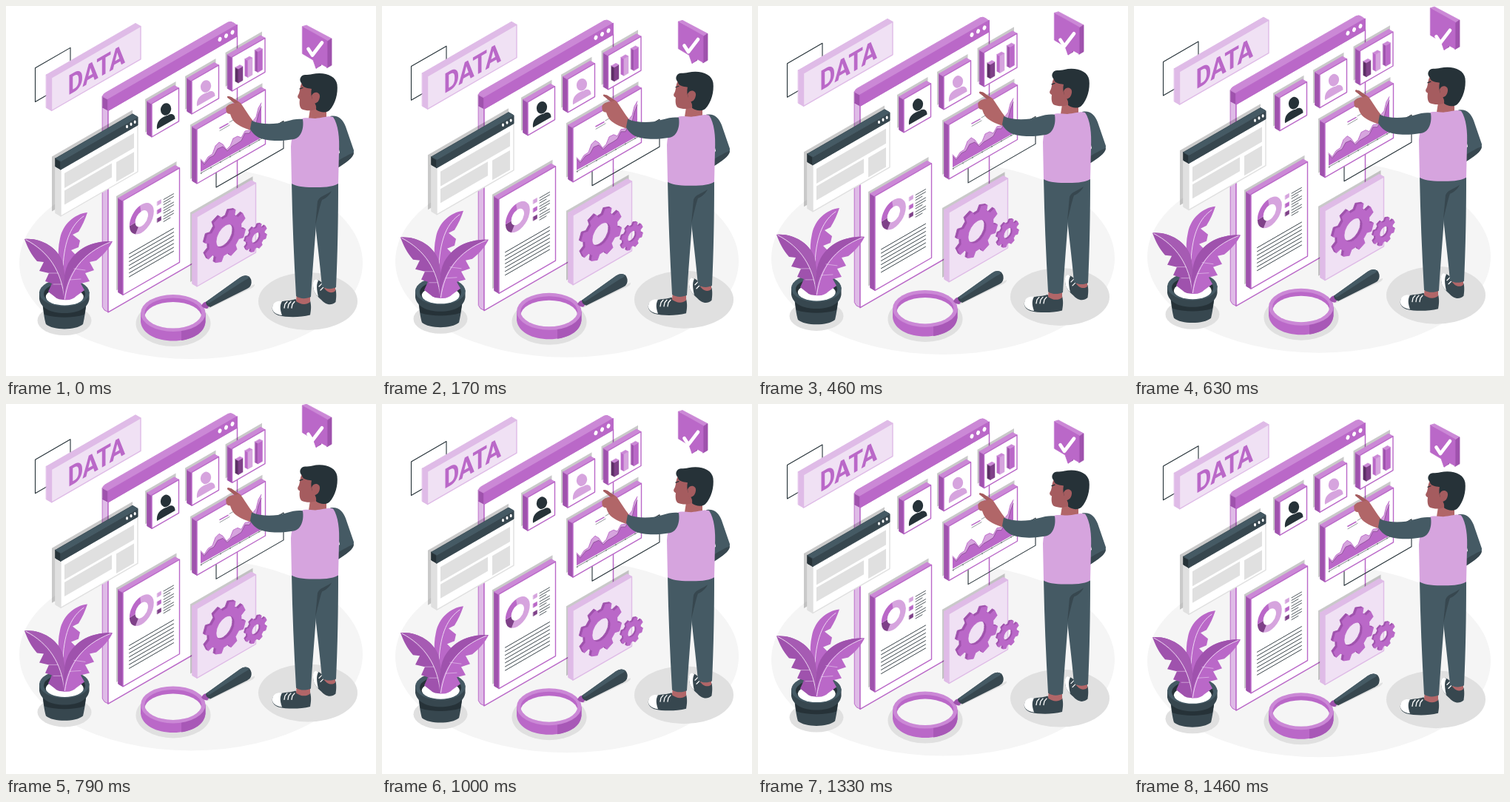
These frames come from a looping animation (500x500 px, 1500 ms). An HTML page:

```html
<!DOCTYPE html>
<html lang="en">
<head>
<meta charset="utf-8">
<title>Data dashboard</title>
<style>
html, body { margin: 0; width: 100%; height: 100%; overflow: hidden; background: #fff; }
svg { display: block; width: 100vw; height: 100vh; }
</style>
</head>
<body>
<svg id="stage" viewBox="0 0 500 500" xmlns="http://www.w3.org/2000/svg"></svg>
<script>
const C = {
  main: '#ba68c8', dark: '#9f52ad', deep: '#7f4189', top: '#cb88d6', soft: '#d6a4de',
  pale: '#f0e1f4', edge: '#dfbbe7', slate: '#455a64', navy: '#37474f', ink: '#263238',
  grey: '#e0e0e0', skin: '#b16668', face: '#a55c5f'
};
const K = 0.577; // isometric slope

const path = (d, fill = 'none', stroke = 'none', w = 1, extra = '') =>
  `<path d="${d}" fill="${fill}" stroke="${stroke}" stroke-width="${w}" stroke-linejoin="round" stroke-linecap="round" ${extra}/>`;
const poly = (pts, fill, stroke, w, extra) => path('M' + pts.join('L') + 'Z', fill, stroke, w, extra);
const line = (pts, stroke, w = 1) => path('M' + pts.join('L'), 'none', stroke, w);
const oval = (x, y, rx, ry, fill, extra = '') =>
  `<ellipse cx="${x}" cy="${y}" rx="${rx}" ry="${ry}" fill="${fill}" ${extra}/>`;
const iso = (x, y, body) => `<g transform="matrix(.866 -.5 0 1 ${x} ${y})">${body}</g>`;

// Parallelogram lying in the wall plane
const slab = (x, y, w, h) => [[x, y], [x + w, y - K * w], [x + w, y - K * w + h], [x, y + h]];

function panel(x, y, w, h, o = {}) {
  const { side = C.dark, top = C.top, face = '#fff', stroke = C.main, d = 6, shade = 3 } = o;
  const e = d * K, r = x + w, yr = y - K * w;
  return (shade ? poly(slab(x - d - shade, y - e - 2.5, w + 5, h), '#000', 'none', 1, 'fill-opacity=".21"') : '') +
    poly([[x - d, y - e], [x, y], [x, y + h], [x - d, y + h - e]], side, side, 1) +
    poly([[x - d, y - e], [r - d, yr - e], [r, yr], [x, y]], top, top, 1) +
    poly(slab(x, y, w, h), face, stroke, 1.4);
}

function gear(x, y, r, hole, depth) {
  const n = 8, pts = [];
  for (let i = 0; i < n; i++) {
    const a = (i + 0.45) * 2 * Math.PI / n;
    for (const [da, q] of [[-0.24, 0.79], [-0.16, 1], [0.16, 1], [0.24, 0.79]])
      pts.push([(r * q * Math.cos(a + da)).toFixed(1), (r * q * Math.sin(a + da)).toFixed(1)]);
  }
  const d = 'M' + pts.join('L') + `ZM${hole} 0A${hole} ${hole} 0 1 0 ${-hole} 0A${hole} ${hole} 0 1 0 ${hole} 0Z`;
  let out = '';
  for (let i = depth; i >= 0; i--)
    out += iso(x - i, y - i * K, path(d, i ? C.dark : C.main, i ? C.dark : C.main, 0.8, 'fill-rule="evenodd"'));
  return out;
}

function arc(r, a, b, color) {
  const p = t => `${(r * Math.cos(t)).toFixed(2)} ${(r * Math.sin(t)).toFixed(2)}`;
  return `<path d="M${p(a)}A${r} ${r} 0 ${b - a > Math.PI ? 1 : 0} 1 ${p(b)}" fill="none" stroke="${color}" stroke-width="9"/>`;
}

const avatar = (x, y, color) =>
  path(`M${x - 12} ${y + 27}C${x - 13} ${y + 17} ${x - 8} ${y + 12} ${x} ${y + 9}C${x + 8} ${y + 4} ${x + 12.5} ${y + 7} ${x + 12.5} ${y + 13}Z`, color) +
  oval(x, y, 7.4, 8.8, '#fff') + oval(x, y, 7, 8.4, color, `transform="rotate(18 ${x} ${y})"`);

const bar = (x, y, h, color, side) =>
  poly([[x, y], [x + 4, y + 2], [x + 4, y + 2 + h], [x, y + h]], side, side, 0.5) +
  poly(slab(x + 4, y + 2, 6, h), color, color, 0.5) +
  poly([[x, y], [x + 6, y - 3.5], [x + 10, y - 1.5], [x + 4, y + 2]], C.top, C.top, 0.5);

function banner() {
  return poly(slab(39.5, 83.8, 47.5, 45.6), 'none', C.ink, 1.1) +
    panel(61.5, 97, 120.5, 44.5, { side: C.edge, top: C.edge, face: C.pale, stroke: C.edge, d: 7, shade: 0 }) +
    iso(83.5, 121, `<text font-family="Roboto, Arial, sans-serif" font-weight="600" font-size="37" letter-spacing="-.8" fill="${C.main}">DATA</text>`);
}

function mainWindow() {
  return poly([[130.5, 137], [138, 141], [138, 413.5], [133, 411], [130.5, 407]], C.edge, C.main, 1) +
    poly(slab(138, 141, 174.5, 272.8), '#fff', C.main, 1.5) +
    poly([[130.5, 122], [138, 126], [138, 141], [130.5, 137]], C.dark, C.dark, 1) +
    path('M130.5 122Q131 119 134 117.5L300 22Q304 20 308 23L312 26L138 126Z', C.top, C.top, 1) +
    poly(slab(138, 126, 174.5, 15.5), C.main, C.main, 1) +
    [[289, 45], [297.5, 40.3], [306, 35.6]].map(([x, y]) => oval(x, y, 2.3, 3.2, '#fff', `transform="rotate(20 ${x} ${y})"`)).join('');
}

function browser() {
  return panel(74, 210, 104, 74, { side: C.grey, top: C.navy, stroke: C.grey, d: 7, shade: 5 }) +
    poly([[67, 206], [74, 210], [74, 221], [67, 217]], C.ink, C.ink, 1) +
    poly(slab(74, 210, 104, 11), C.navy, C.navy, 1) +
    poly([[67, 206], [171, 146], [178, 150], [74, 210]], C.slate, C.slate, 0.6) +
    [[163.5, 163], [169, 159.8], [174.2, 156.8]].map(([x, y]) => oval(x, y, 1.5, 2.2, '#fff')).join('') +
    poly(slab(79, 226, 94, 20), C.grey) + poly(slab(79, 249.5, 64, 19), C.grey) +
    poly(slab(149, 211, 24, 26.5), C.grey);
}

function chart() {
  const back = 'M263 207L268 212L273 204L279 200L283 189L288 184L293 187L298 194L303 189L307 179L313 176L318 178L323 169L329 168L334 155L338 150L341 138L345 131';
  const front = 'M263 209L268 214L275 205L281 202L286 193L293 190L299 196L305 190L312 186L318 182L323 172L329 172L334 162L338 159L341 146L345 136';
  let out = panel(258, 166.5, 92.5, 73.5);
  out += path(back + 'V178L263 224Z', C.soft) + path(front + 'V178L263 224Z', C.main) +
    path(back, 'none', C.main, 0.9) + path(front, 'none', C.deep, 0.7);
  out += line([[263, 226], [346, 179]], C.ink, 0.6);
  for (let i = 0; i < 7; i++) {
    const x = 264 + i * 13, y = 225.4 - i * 13 * K;
    out += line([[x, y], [x, y + 1.4]], C.ink, 0.6);
  }
  return out + line([[289, 165], [300, 159]], C.main, 1.6) + line([[289, 168.5], [302, 161]], C.ink, 0.5) +
    line([[302, 157], [309, 153], [314, 158]], C.ink, 0.5);
}

function report() {
  let out = panel(158, 263, 76.5, 127.5);
  out += iso(183.3, 287.3, arc(14.5, -1.7, 2.1, C.soft) + arc(14.5, 2.1, 3.1, C.deep) + arc(14.5, 3.1, 4.6, C.main));
  [C.soft, C.main, C.deep].forEach((c, i) => {
    const y = 264.5 + i * 11.4;
    out += poly(slab(204.5, y, 5, 5), c, c, 0.6);
    for (const dy of [-2, 1.6, 5]) out += line([[213, y + dy - 1], [dy > 4 ? 222 : 226.5, y + dy - (dy > 4 ? 6.2 : 8.8)]], C.ink, 0.8);
  });
  for (let i = 0; i < 7; i++) {
    const y = 335 + i * 5.15;
    out += line([[166.5, y], [226.5, y - 34.6]], C.ink, 0.9);
  }
  return out;
}

function cards() {
  return panel(197, 132, 36.5, 45) + avatar(216, 139.5, C.ink) +
    panel(251, 101, 36.5, 45) + avatar(270, 108.5, C.soft) +
    panel(305.5, 69, 44.5, 46) +
    bar(310, 83, 19, C.deep, '#5d2f66') + bar(323, 71.5, 23, C.soft, C.main) + bar(336.5, 59.5, 28, C.main, C.dark);
}

function plant() {
  const vein = (d, w = 0.9) => path(d, 'none', '#f3e4f6', w);
  return oval(79, 425, 36.5, 20, C.grey) +
    path('M49 398C50 410 52 424 54 430C64 438.5 94 438.5 104 430C106 422 108 408 109 398Z', C.navy) +
    path('M49 400C51 410 51 413 52 417C68 422 90 422 106 417L109 400Z', C.ink) +
    path('M45 386V396C47 408 60 415 79 415C98 415 111 408 112.5 396V386Z', C.navy) +
    oval(78.8, 387.5, 33.8, 18.5, C.slate) + oval(79, 389, 28, 14.5, C.ink) + oval(79.3, 393, 25.5, 11.5, '#fff') +
    path('M110 279C92 281 77 295 73 314C68 336 72 352 79 372L86 347L95 337L88 330L98 326L100 317L90 309L98 305C103 297 107 288 110 279Z', C.main) +
    vein('M105 284C89 295 79 315 77 352') +
    path('M25 315C47 313 69 326 76 345C81 362 78 382 80 397C73 397 69 396 66 393L57 386L62 375L53 372L58 361L45 358L51 346L42 345C34 336 29 326 25 315Z', C.dark) +
    path('M25 315C47 313 69 326 76 345C81 362 78 382 80 397C76 365 62 338 25 315Z', '#a65bb3') +
    vein('M27 316C58 332 75 358 79 396') + vein('M70 361L58 361M75 376L64 376', 0.5) +
    path('M144 318C117 317 96 327 84 348C76 365 78 382 78 397C86 398 91 396 95 392L106 384L101 375L113 372L107 361L119 357L113 346L122 344C132 336 139 328 144 318Z', C.main) +
    path('M144 318C117 317 96 327 84 348C76 365 78 382 78 397C81 366 99 333 144 318Z', C.dark) +
    vein('M141 319C102 334 84 362 79.5 396') + vein('M92 355L107 357M86 370L101 369', 0.5);
}

function magnifier() {
  return oval(226, 429, 50.5, 31, C.grey) + path('M272 410L326 384Q337 380 336 376L274 402Z', C.grey) +
    path('M182 415V427C184 443 203 452.5 226 452.5C249 452.5 268 443 269.5 427V415Z', C.main) +
    path('M237 439V452C255 449 268 441 269.5 427V415Z', '#a858b7') +
    oval(225.8, 415, 43.8, 25, C.top) + oval(225.8, 415, 38.5, 20.5, C.main) +
    '<clipPath id="lens"><ellipse cx="225.8" cy="415" rx="38.5" ry="20.5"/></clipPath>' +
    oval(225.8, 420.5, 38.5, 20.5, '#f5f5f5', 'clip-path="url(#lens)"') +
    path('M264 405Q267 399 272 400L276 404L272 409Q267 409 264 405Z', C.dark) +
    path('M270 400L316 367Q323 362 329 366Q333 371 331 377Q330 380 326 382L276 407Q270 405 270 400Z', C.navy) +
    path('M270 400L316 367Q323 362 329 366Q327 369 322 371L274 402Z', C.slate);
}

function person() {
  return oval(408, 399, 67, 39, C.grey) +
    // far foot
    path('M415 377C414 370 420 367 427 374C433 383 440 386 445.5 383C447 390 446 396 445.5 400C439 406 431 403 426 397C419 391 415 385 415 377Z', C.navy) +
    path('M415 377C414 370 419 368 422 371C419 377 420 383 422 393C417 388 415 383 415 377Z', '#fff') +
    line([[423, 379], [427, 375]], '#fff', 1.3) + line([[425, 384], [430, 379]], '#fff', 1.3) +
    path('M428 372L445 374V385C439 390 432 386 428 378Z', C.skin) +
    // near foot
    path('M360 407C362 397 380 400 391 396C397 402 406 402 411 398C413 406 412 412 411 417.5C397 421 380 421 368 418C362 416 359 411 360 407Z', C.navy) +
    path('M360 407C361 400 367 398 373 399C370 404 370 410 373 418C364 417 359 412 360 407Z', '#fff') +
    [376, 381, 386].map(x => line([[x, 408], [x + 1, 403], [x + 4, 399.5]], '#fff', 1.3)).join('') +
    path('M393 387L411 389V400C405 405 397 403 392 399Z', C.skin) +
    // trousers
    path('M413 240L449 236C449 290 448 335 446 380C441 383 432 383 427 379C424 345 420 315 417 285Z', C.slate) +
    path('M386 238L440 242C434 252 423 258 421 266C419 300 415 345 412 393C406 396 397 396 392 392C389 340 387 290 386 238Z', C.slate) +
    path('M440 250C432 256 423 257 421 264L418 296C421 285 424 270 427 262C432 260 437 256 440 250Z', C.navy) +
    // rear arm
    path('M438 149C449 147 455 153 459 163L470 195C471 204 460 211 447 219.5V204L451 198L446 178Z', C.slate) +
    path('M470 198C470 205 459 212 447 219.5V210C456 205 464 200 470 198Z', C.navy) +
    // neck and face
    path('M411 139L433 136L433 152C425 155 415 155 409 152Z', C.skin) +
    path('M400 103C396 111 398 115 395 120C393 123 395 125 397 126C396 132 397 138 400 139.5C406 142 414 142 420 139L422 110L412 102Z', C.face) +
    line([[397, 112], [401, 110.5]], C.ink, 1.2) +
    path('M398 97C400 91 408 94 414 92C430 88.5 446 94 447.5 106C449 118 445 133 437 141C432 145 424 144 419 140C420 134 417 131 415 128C412 123 412 116 413 112C407 111 400 110 400 105C397 102 397 99 398 97Z', C.ink) +
    path('M413 121C416 114 425 116 424 123C423 130 418 133 414 131Z', C.face) +
    // vest
    path('M399 153C404 150 410 152 418 152C429 151 436 148 442 150C449 160 451 178 450 197L449 240C440 245 428 245 415 245C401 245 390 243 386 240L385 190C386 175 390 163 399 153Z', C.soft) +
    // pointing arm
    path('M299.5 122C303 121.5 306 124 309 126L317 131C322 138 328 148 335 157L336 169C325 167 314 162 308 156C305 152 304 149 303 146C299 146 297 143 297.5 140C296 136 301 132 309 131.5L301 125C299 124 298.5 122.5 299.5 122Z', C.skin) +
    path('M299.5 122C303 121.5 306 124 309 126L315 130L309 131.5L301 125C299 124 298.5 122.5 299.5 122Z', C.face) +
    path('M332 155C346 161 365 160 378 156C388 153 395 152 401 153C403 165 399 178 389 180C372 183 353 183 342 178C336 175 331 169 330 166Z', C.slate);
}

function bubble() {
  return '<g id="bubble">' +
    poly([[401, 27.5], [406, 26], [440, 44], [434, 48]], C.top, C.top, 0.8) +
    poly([[434, 48], [440, 44], [440, 80], [434, 83.5]], C.dark, C.dark, 0.8) +
    path('M419 84.5L426 80.5L427 77L418 80Z', C.dark) +
    poly([[400.7, 28], [434, 47], [434, 83], [426, 78.5], [419, 84.5], [415, 73], [400.7, 64.5]], C.main, C.main, 0.8) +
    '</g><g id="tick">' + line([[408.5, 58], [414, 66.5], [427, 49.5]], '#fff', 4.7) + '</g>';
}

const stage = document.getElementById('stage');
stage.innerHTML = '<g id="scene">' + oval(250, 347, 232, 130, '#f5f5f5') +
  banner() + mainWindow() + browser() + cards() +
  poly(slab(284, 208, 91, 37), 'none', C.ink, 1.1) +
  chart() + report() +
  panel(258, 285, 79.5, 94, { side: C.edge, top: C.edge, face: C.pale, stroke: C.edge }) +
  gear(296.5, 311, 32, 14.5, 3) + gear(338, 313.5, 17, 7, 2) +
  plant() + magnifier() + person() + bubble() + '</g>';

const [scene, balloon, tick] = ['scene', 'bubble', 'tick'].map(id => document.getElementById(id));
const LOOP = 1500, STEPS = 36, PHASE = 0.75;
const shift = (el, y) => el.setAttribute('transform', `translate(0 ${y.toFixed(3)})`);

// Linear rise and fall, stepped at 24 per second
function draw(ms) {
  const step = Math.floor(((ms % LOOP) + 4) * STEPS / LOOP);
  const x = ((step + PHASE) % STEPS) / (STEPS / 2);
  const rise = (x < 1 ? x : 2 - x) - PHASE / (STEPS / 2);
  shift(scene, -10 * rise);
  shift(balloon, -20 * rise);
  shift(tick, -10 * rise);
}

function loop() {
  draw(performance.now());
  requestAnimationFrame(loop);
}
loop();
</script>
</body>
</html>
```
